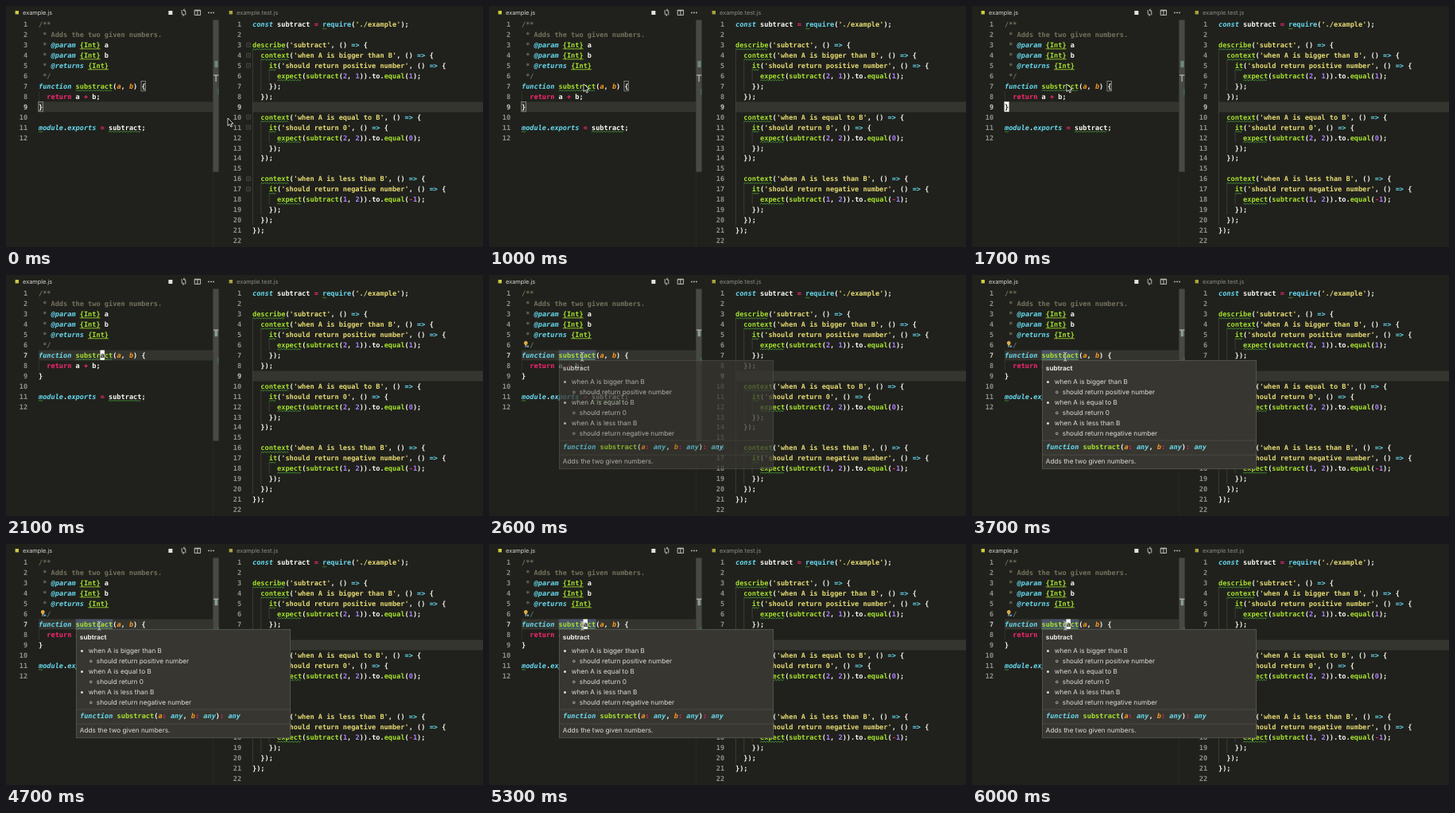
An HTML page for the animation above (6100 ms loop, 600 by 303 pixels).

```html
<!DOCTYPE html>
<html lang="en">
<head>
<meta charset="utf-8">
<title>Editor hover</title>
<style>
html, body { margin: 0; width: 100%; height: 100%; overflow: hidden; background: #20211c; }
svg { display: block; width: 600px; height: 303px; text-rendering: geometricPrecision; }
text { white-space: pre; }
.code { font: bold 8.6px "DejaVu Sans Mono", monospace; }
.ui { font: 8.22px Inter, sans-serif; }
</style>
</head>
<body>
<svg id="stage" viewBox="0 0 600 303">
  <rect width="600" height="303" fill="#20211c"/>
  <rect id="line" x="41" width="219.4" height="12.9" fill="#34342f"/>
  <g id="back"></g>
  <g id="word"><rect x="87.6" y="94.5" width="46.8" height="12.5" fill="#4a5366"/></g>
  <g id="text"></g>
  <g id="folds"></g>
  <g id="brackets" fill="none" stroke="#a5a59d" stroke-width=".7"></g>
  <g id="bar"></g>
  <g id="bulb">
    <rect x="42" y="81" width="9" height="12" fill="#20211c"/>
    <path d="M46.3 83a2.5 2.5 0 0 1 1.3 4.6v1.2h-2.6v-1.2a2.5 2.5 0 0 1 1.3-4.6z" fill="#d9ac4a"/>
    <path d="M45 90h2.6" stroke="#b8b8b2" stroke-width=".9"/>
    <circle cx="49" cy="89.8" r="1.3" fill="#4b9fe0"/>
  </g>
  <g id="caret"></g>
  <g id="popup"></g>
  <path id="arrow" d="M0 0V9.6L2.3 7.5L3.9 11L5.4 10.4L3.9 7H7Z" fill="#000" stroke="#fff" stroke-width=".8"/>
  <path id="beam" d="M115 97.4q2.2 0 2.2 1.4q0-1.4 2.2-1.4M117.2 98.6v8.4M115.2 108.2q2 0 2-1.4q0 1.4 2.2 1.4M115.8 103.8h2.8" fill="none" stroke="#d5d5d0" stroke-width=".9"/>
</svg>
<script>
const CW = 5.178, LH = 12.95, LOOP = 6100, CLICK = 1900;
const WHITE = '#f8f8f2', CYAN = '#66d9ef', PINK = '#f92672', GREEN = '#a6e22e',
      YELLOW = '#e6db74', PURPLE = '#ae81ff', ORANGE = '#fd971f', GREY = '#75715e',
      DIM = '#8f908a', LIT = '#c9c9c4';
const $ = id => document.getElementById(id);

function add(parent, tag, attrs, content) {
  const el = document.createElementNS('http://www.w3.org/2000/svg', tag);
  for (const k in attrs) el.setAttribute(k, attrs[k]);
  if (content !== undefined) el.textContent = content;
  parent.appendChild(el);
  return el;
}
const mid = n => 23 + LH * (n - 1);
const rect = (p, x, y, width, height, fill) => add(p, 'rect', { x, y, width, height, fill });
const path = (p, d, stroke, w) => add(p, 'path', { d, stroke, 'stroke-width': w, fill: 'none' });
const ui = (p, x, y, s, fill, style = '') => add(p, 'text', { class: 'ui', x, y, fill, style }, s);

const word = (p, x, y, s, fill, italic, weight = 'bold') =>
  add(p, 'text', { class: 'code', x, y, fill,
    style: `font-weight:${weight};font-style:${italic ? 'italic' : 'normal'}` }, s);

function squiggle(x, y, w) {
  let d = `M${x} ${y}`;
  for (let i = 1; i * 1.75 <= w; i++) d += `L${x + i * 1.75} ${y + (i % 2 ? -1.4 : 0)}`;
  path($('text'), d, '#4fa83d', .8);
}

const TOKENS = /'[^']*'|=>|\w+|[=+:-]|[^\s\w'=+:-]+/g;
function paint(s, next, isDef) {
  if (s[0] === "'") return [YELLOW];
  if (s === '=>' || s === 'require') return [CYAN];
  if (/^(const|function|module|exports|any)$/.test(s)) return [CYAN, true];
  if (/^(return|[=+:-])$/.test(s)) return [PINK];
  if (/^\d$/.test(s)) return [PURPLE];
  if (isDef && /^[ab]$/.test(s)) return [ORANGE, true];
  return /^\w/.test(s) && next === '(' ? [GREEN] : [WHITE];
}

function code(p, x, y, line, lint) {
  const isDef = line.startsWith('function');
  for (const m of line.matchAll(TOKENS)) {
    const s = m[0], tx = x + m.index * CW;
    const [fill, italic] = paint(s, line[m.index + s.length], isDef);
    word(p, tx, y, s, fill, italic);
    if (!lint) continue;
    if (/^(describe|context|it|expect|substract)$/.test(s)) squiggle(tx, y + 3.1, s.length * CW);
    if (/^(module|require)$/.test(s)) squiggle(tx, y + 3.1, 6);
    if (s === 'subtract' && line.startsWith('module')) squiggle(tx, y + 3.1, s.length * CW);
  }
}

function comment(line, y) {
  const m = line.match(/^( \* )(@\w+) (\{Int\}) ?(\w*)/);
  const t = $('text');
  if (!m) return word(t, 41, y, line, GREY);
  const at = c => 41 + c * CW;
  const type = 4 + m[2].length;
  word(t, 41, y, m[1], GREY);
  word(t, at(3), y, m[2], CYAN, true);
  word(t, at(type), y, m[3], GREEN);
  path(t, `M${at(type)} ${y + 1.9}h${5 * CW}`, GREEN, .8);
  word(t, at(type + 6), y, m[4], WHITE);
}

const left = `/**
 * Adds the two given numbers.
 * @param {Int} a
 * @param {Int} b
 * @returns {Int}
 */
function substract(a, b) {
  return a + b;
}

module.exports = subtract;
`.split('\n');

const cases = [['bigger than', 'positive number', '2, 1', '1'],
               ['equal to', '0', '2, 2', '0'],
               ['less than', 'negative number', '1, 2', '-1']];
const right = ["const subtract = require('./example');", '', "describe('subtract', () => {"];
cases.forEach(([rel, out, args, res], i) => {
  if (i) right.push('');
  right.push(`  context('when A is ${rel} B', () => {`,
    `    it('should return ${out}', () => {`,
    `      expect(subtract(${args})).to.equal(${res});`, '    });', '  });');
});
right.push('});', '');

const nums = { left: [], right: [] };
function numbers(list, count, x) {
  for (let n = 1; n <= count; n++) {
    const el = word($('text'), x, mid(n) + 3.1, n, DIM);
    el.setAttribute('text-anchor', 'end');
    list.push(el);
  }
}

function buildEditors() {
  const b = $('back'), t = $('text');
  rect(b, 310, 120.6, 290, 12.9, '#34352f');
  const guide = (col, from, to) =>
    path(b, `M${310.4 + col * CW} ${mid(from) - 6.5}V${mid(to) + 6.5}`, '#494a43', .7);
  guide(0, 4, 20);
  [4, 10, 16].forEach(n => { guide(2, n + 1, n + 3); guide(4, n + 2, n + 2); });
  path(b, `M41.4 ${mid(8) - 6.5}v${LH}`, '#3b3c36', .7);

  left.forEach((s, i) => {
    const y = mid(i + 1) + 3.1;
    i < 6 ? comment(s, y) : code(t, 41, y, s, true);
  });
  right.forEach((s, i) => code(t, 310, mid(i + 1) + 3.1, s, true));
  numbers(nums.left, 12, 27.2);
  numbers(nums.right, 22, 296.2);
  nums.right[8].setAttribute('fill', LIT);

  [3, 4, 5, 10, 11, 16, 17].forEach(n => {
    const y = mid(n);
    path($('folds'), `M302.6 ${y - 2.4}h4.8v4.8h-4.8zM303.8 ${y}h2.4`, '#62635c', .6);
  });
  [[170, 7], [40.8, 9]].forEach(([x, n]) =>
    add($('brackets'), 'rect', { x, y: mid(n) - 6.2, width: 5.6, height: 12.4 }));
}

function buildBars() {
  const t = $('text'), c = '#d0d0cb';
  rect(t, 11.6, 6, 4.4, 4.4, '#cbcb41');
  rect(t, 280.6, 6, 4.4, 4.4, '#a5a53c');
  ui(t, 21, 10.8, 'example.js', '#d4d4cf', 'font-size:7.4px');
  ui(t, 290, 10.8, 'example.test.js', '#8c8c85', 'font-size:7.4px');
  rect(t, 204.4, 6, 5, 5, '#e2e2de');
  path(t, 'M221.2 5v4.6q0 1.6 1.6 1.6h1M225.8 11.4v-4.6q0-1.6-1.6-1.6h-1M222.6 9.8l1.6 1.4l-1.6 1.4M224.6 3.8l-1.6 1.4l1.6 1.4', c, .9);
  path(t, 'M237.2 5.2h7.4v6.2h-7.4zM240.9 5.2v6.2M237.2 5.8h7.4', c, .9);
  [255, 258, 261].forEach(cx => add(t, 'circle', { cx, cy: 8.4, r: .85, fill: c }));

  rect(t, 260, 17.5, .6, 286, '#2c2d28');
  rect(t, 260.4, 17.5, 7.2, 191, '#484945');
  rect(t, 262.4, 69, 4.2, 8.2, '#6f8580');
  rect(t, 265.8, 104, 1.8, 7.5, '#3f6450');
  path($('bar'), 'M261 .8h6.4M264.1 .8v8', '#a6a6a0', 1.5);
}

function buildPopup() {
  const p = $('popup'), ink = '#dededa';
  add(p, 'rect', { x: 88.4, y: 107.5, width: 269.2, height: 136.2, fill: '#373630', stroke: '#5b5a54', 'stroke-width': .8 });
  ui(p, 92.8, 120.1, 'subtract', '#ecece7', 'font-weight:700');
  cases.forEach(([rel, out], i) => {
    const y = 134 + i * 26;
    add(p, 'circle', { cx: 95.5, cy: y + .4, r: 1.5, fill: ink });
    ui(p, 103.8, y + 3.1, `when A is ${rel} B`, ink);
    add(p, 'circle', { cx: 106.8, cy: y + 13.4, r: 1.35, fill: 'none', stroke: ink, 'stroke-width': .7 });
    ui(p, 113.8, y + 16.1, `should return ${out}`, ink);
  });
  [208, 226.2].forEach(y =>
    path(p, `M89 ${y}H357`, '#65645e', .7).setAttribute('stroke-dasharray', '1.2 .9'));
  code(p, 93, 219.2, 'function substract(a: any, b: any): any');
  ui(p, 92.8, 237.3, 'Adds the two given numbers.', ink);
}

const carets = [[0, 9, '}'], [15, 7, 'a']].map(([col, n, ch]) => {
  const g = add($('caret'), 'g', {}), x = 41 + col * CW;
  rect(g, x - .2, mid(n) - 6.2, CW + .4, 12.4, '#f8f8f0');
  word(g, x, mid(n) + 3.1, ch, '#20211c');
  return g;
});

const clamp = v => Math.max(0, Math.min(1, v));
const show = (el, o) => el.setAttribute('opacity', +o);

function draw(t) {
  const clicked = t >= CLICK;
  const k = clamp((t - 200) / 700), e = k * k * (3 - 2 * k);
  const mx = 279 - 160 * e, my = 141 - 43 * e;
  $('arrow').setAttribute('transform', `translate(${mx} ${my})`);
  show($('arrow'), !clicked);
  show($('beam'), t >= 2300);
  show($('folds'), mx > 268 ? 1 : 1 - clamp((t - 450) / 300));
  show($('brackets'), !clicked);
  show($('word'), t >= 2300);
  show($('bulb'), t >= 2400);
  show($('popup'), clamp((t - 2450) / 200));
  show(carets[0], !clicked && (t + 600) % 1000 < 500);
  show(carets[1], clicked && (t - CLICK) % 1000 < 500);
  $('line').setAttribute('y', mid(clicked ? 7 : 9) - 6.2);
  $('bar').setAttribute('transform', `translate(0 ${clicked ? 68.5 : 86.2})`);
  nums.left[6].setAttribute('fill', clicked ? LIT : DIM);
  nums.left[8].setAttribute('fill', clicked ? DIM : LIT);
}

buildEditors();
buildBars();
buildPopup();
const start = performance.now();
function tick() {
  const t = (performance.now() - start) % LOOP;
  draw(Math.floor(t / 100) * 100);
  requestAnimationFrame(tick);
}
tick();
</script>
</body>
</html>
```
